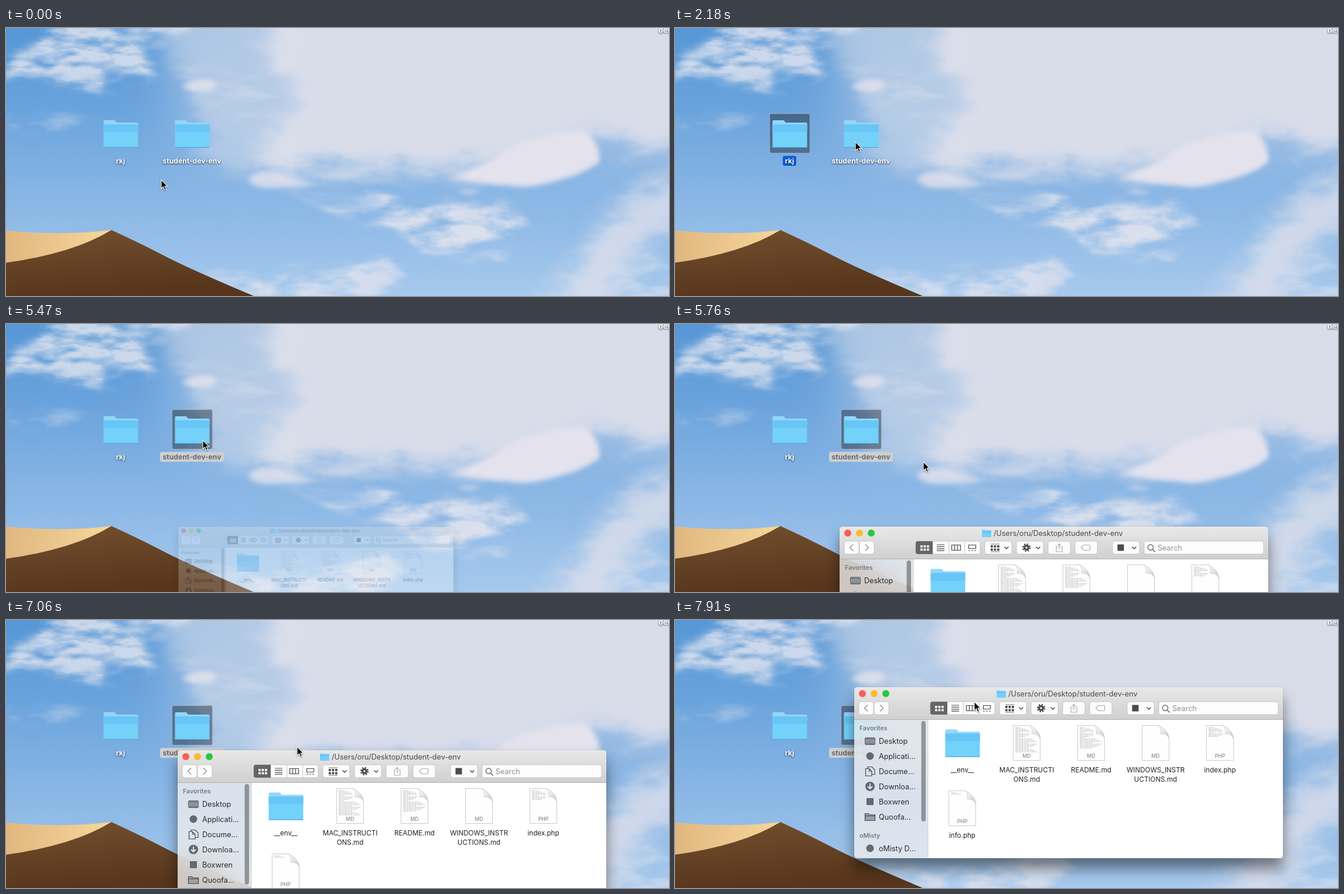
An HTML page for the animation above (8000 ms loop, 1132x459 px).

```html
<!DOCTYPE html>
<html lang="en">
<head>
<meta charset="utf-8">
<title>Opening a folder</title>
<style>
html, body { margin: 0; width: 100%; height: 100%; overflow: hidden; background: #84b2e3; }
#stage { position: relative; width: 100%; height: 100%; overflow: hidden; contain: strict; }
svg { position: absolute; left: 0; top: 0; display: block; }
text { font: 12.6px Inter, sans-serif; fill: #2b2b2b; }
#sky { will-change: transform; }
.desk { font-size: 12.1px; font-weight: 700; fill: #fff; text-anchor: middle; filter: drop-shadow(0 1px 1.5px #000b); }
.desk.inactive { fill: #6b6b6b; filter: none; }
.file { font-size: 11.6px; text-anchor: middle; fill: #222; }
.kind { font-size: 8.6px; text-anchor: middle; fill: #777; }
.head { font-size: 10.7px; font-weight: 600; fill: #74797e; }
.line { fill: none; stroke: #4a4a4a; stroke-width: 1.2; }
#win { position: absolute; left: 0; top: 0; width: 732px; height: 293px; border-radius: 5px;
  transform-origin: 37px 0; box-shadow: 0 18px 25px #0007, 0 0 1px #0009; }
#side { position: absolute; left: 0; top: 55px; width: 126px; height: 238px; border-radius: 0 0 0 5px;
  background: rgba(238, 238, 238, .79); backdrop-filter: blur(22px); }
</style>
</head>
<body>
<div id="stage">
<svg id="sky" width="1132" height="459">
  <defs>
    <linearGradient id="air" x2="0" y2="1">
      <stop stop-color="#5797d6"/><stop offset=".28" stop-color="#68a2dc"/>
      <stop offset=".6" stop-color="#86b4e4"/><stop offset="1" stop-color="#a6c9ed"/>
    </linearGradient>
    <linearGradient id="sand"><stop stop-color="#e0b780"/><stop offset="1" stop-color="#f6d799"/></linearGradient>
    <linearGradient id="dune" x2=".3" y2="1"><stop stop-color="#74502f"/><stop offset="1" stop-color="#57361c"/></linearGradient>
    <linearGradient id="bar" x2="0" y2="1"><stop stop-color="#e8e8e8"/><stop offset="1" stop-color="#d0d0d0"/></linearGradient>
    <linearGradient id="curl" x2="1" y2="1"><stop stop-color="#fff"/><stop offset="1" stop-color="#c9c9c9"/></linearGradient>
    <filter id="veil" filterUnits="userSpaceOnUse" x="-60" y="-60" width="1260" height="590" color-interpolation-filters="sRGB">
      <feTurbulence type="fractalNoise" baseFrequency=".012 .025" numOctaves="4" seed="4" result="noise"/>
      <feGaussianBlur in="SourceGraphic" stdDeviation="17"/>
      <feDisplacementMap in2="noise" scale="60" xChannelSelector="R" yChannelSelector="G"/>
    </filter>
    <filter id="wisp" filterUnits="userSpaceOnUse" x="-60" y="-60" width="1260" height="590" color-interpolation-filters="sRGB">
      <feTurbulence type="fractalNoise" baseFrequency=".012 .034" numOctaves="5" seed="9" result="noise"/>
      <feColorMatrix values="0 0 0 0 0  0 0 0 0 0  0 0 0 0 0  3.2 0 0 0 -.95" result="streaks"/>
      <feGaussianBlur in="SourceGraphic" stdDeviation="9"/>
      <feDisplacementMap in2="noise" scale="45" xChannelSelector="G" yChannelSelector="B"/>
      <feComposite in2="streaks" operator="in"/>
    </filter>
    <filter id="soft" x="-30%" y="-30%" width="160%" height="160%"><feGaussianBlur stdDeviation="4"/></filter>
    <filter id="haze" x="-30%" y="-30%" width="160%" height="160%"><feGaussianBlur stdDeviation="45"/></filter>
    <symbol id="folder" viewBox="0 0 60 49">
      <path d="M.5 10V3q0-2 2-2h16q2 0 3 2l1 2h35q2 0 2 2v8z" fill="#92d6f9"/>
      <path d="M.5 8h59v39q0 1-1 1h-57q-1 0-1-1z" fill="#74d1fa"/>
      <path d="M.5 8h59v13H.5z" fill="#67c6f6"/>
      <path d="M.5 47.6h59" stroke="#4a9fce"/>
    </symbol>
  </defs>
  <path fill="url(#air)" d="M0 0h1132v459H0z"/>
  <path filter="url(#haze)" fill="#d8deed" opacity=".45" d="M250-120H1250V225H400L300 200z"/>
  <g filter="url(#veil)" fill="#dfe0eb">
    <path opacity=".92" d="M430-60H1200V205L1090 205 1030 185 960 180 900 228 760 245 640 240 540 245 440 240 420 205 470 160 500 110 440 50z"/>
    <path opacity=".4" d="M250-60H500V250L380 245 335 215 340 150 300 70z"/>
    <path opacity=".8" d="M1200 215L1090 275 1020 325 985 400 900 480 1020 480 1070 410 1110 350 1200 330z"/>
  </g>
  <g filter="url(#wisp)" fill="#e0e3ee">
    <path opacity=".85" d="M-20 90L50 30 90-20 330-20 300 20 225 28 260 75 230 92 160 75 180 108 120 98 60 85z"/>
    <path opacity=".5" d="M-20 162L60 152 130 144 100 168 40 175z"/>
    <path opacity=".4" d="M300 60L420 90 480 140 400 150 320 120z"/>
    <path opacity=".9" d="M590 275L690 302 760 300 850 305 885 340 860 375 790 392 735 390 670 345z"/>
    <path opacity=".6" d="M480 275L600 300 700 350 640 340 540 310z"/>
    <path opacity=".8" d="M340 425L440 432 520 415 640 400 700 410 660 440 620 480 400 480z"/>
    <path opacity=".5" d="M1040 430L1150 370V480H1050z"/>
  </g>
  <g filter="url(#soft)" fill="#e3e2ed">
    <path d="M760 256Q830 230 860 205 920 178 985 176 1012 190 1014 228 990 250 930 264 890 276 860 270 800 266 760 256z"/>
    <path d="M300 100Q325 84 358 92 362 102 340 108 318 112 300 100z" opacity=".8"/>
    <path d="M413 258Q425 242 460 248 500 260 532 268 490 274 440 274 420 272 413 258z" opacity=".8"/>
    <path d="M768 280Q790 274 812 282 790 288 768 280z" opacity=".7"/>
  </g>
  <path fill="url(#sand)" d="M0 347Q100 356 180 346 170 380 0 404z"/>
  <path fill="url(#dune)" d="M0 402Q115 386 180 346 228 368 270 390T423 459H0z"/>
</svg>

<svg id="desktop" width="1132" height="459"></svg>

<div id="win"><div id="side"></div><svg id="panel" width="732" height="293"></svg></div>

<svg width="1132" height="459">
  <path id="cursor" d="M0 0V15.2L3.5 12 5.9 17.4 8.4 16.3 6.1 11.1H10.8z" stroke="#fff" stroke-width="1.1"
    style="filter:drop-shadow(0 1px 1px #0006)"/>
</svg>
</div>

<script>
const $ = id => document.getElementById(id);
const text = (x, y, string, cls = '', extra = '') => `<text x="${x}" y="${y}" class="${cls}" ${extra}>${string}</text>`;
const rect = (x, y, w, h, fill, r = 0, extra = '') =>
  `<rect x="${x}" y="${y}" width="${w}" height="${h}" rx="${r}" fill="${fill}" ${extra}/>`;
const line = (d, extra = '') => `<path class="line" d="${d}" ${extra}/>`;
const circle = (x, y, r, fill) => `<circle cx="${x}" cy="${y}" r="${r}" fill="${fill}"/>`;
const folder = (x, y, w = 60, h = 49) => `<use href="#folder" x="${x}" y="${y}" width="${w}" height="${h}"/>`;

// Desktop icons
const deskIcon = (id, x, name, labelX, labelWidth) => `
  <g id="${id}">
    ${rect(x - 4.5, 146.5, 69, 68, '#0000005c', 3, 'stroke="#b4b9c299" stroke-width="1.4"')}
    ${rect(labelX, 219, labelWidth, 17, '#0a5fdb', 3.5)}
  </g>
  ${folder(x, 157)}${text(labelX + labelWidth / 2, 232, name, 'desk', `id="${id}Name"`)}`;
$('desktop').innerHTML = deskIcon('first', 166, 'rkj', 184, 23) +
  deskIcon('second', 288, 'student-dev-env', 263, 109) + text(1125, 8, 'des', 'desk');

// Folder window
const button = (x, w) => rect(x, 25, w, 22, '#fcfcfc', 3.5, 'stroke="#bdbdbd" stroke-width=".8"');
const arrow = x => line(`M${x - 3.5} 34.5l3.5 3.5 3.5-3.5`, 'style="stroke-width:1.5"');
const grid = (x, fill) => [0, 1, 2, 3, 4, 5].map(i =>
  rect(x + i % 3 * 5.5, 32 + (i > 2) * 5.5, 3.8, 3.8, fill, .6)).join('');

const toolbar = () =>
  `<path d="M0 55V5q0-5 5-5h722q5 0 5 5v50z" fill="url(#bar)"/>` +
  line('M0 55.5H732', 'style="stroke:#b4b4b4;stroke-width:1"') +
  ['#fc5b57', '#fdbb2f', '#2ac840'].map((color, i) => circle(14 + 20 * i, 11, 6, color)).join('') +
  folder(243, 5, 16, 13) + text(263, 15.7, '/Users/oru/Desktop/student-dev-env', '', 'style="fill:#4a4a4a"') +
  [[8, 25], [34, 25], [130, 110], [248, 46], [302, 46], [356, 38], [402, 38], [466, 46], [520, 204]]
    .map(([x, w]) => button(x, w)).join('') +
  line('M23 30.5l-5.5 5.5 5.5 5.5M44 30.5l5.5 5.5-5.5 5.5', 'style="stroke:#8b8b8b"') +
  `<path d="M159 25h-25.5q-3.5 0-3.5 3.5v15q0 3.5 3.5 3.5H159z" fill="#666"/>` +
  grid(138, '#fff') +
  line('M186.5 25v22M213.5 25v22', 'style="stroke:#c8c8c8;stroke-width:1"') +
  line('M166 31h13m-13 3.4h13m-13 3.4h13m-13 3.4h13') +
  line('M191.5 31.5h15v9h-15zM196.5 31.5v9m5-9v9') +
  line('M220.5 31.5h12v6h-12zM220 41h3m2 0h3m2 0h3') +
  grid(258, '#4a4a4a') + line('M258 30h15M258 43h15', 'style="stroke-width:.8"') + arrow(285) +
  circle(319, 36, 5, '#4a4a4a') +
  `<circle cx="319" cy="36" r="6" class="line" style="stroke-width:2.4;stroke-dasharray:2.36"/>` +
  circle(319, 36, 1.8, '#fcfcfc') + arrow(339) +
  line('M373 34h-3v9h10v-9h-3M375 39.5v-10m-2.5 2.5l2.5-2.5 2.5 2.5M417 31.5h9q1.5 0 1.5 1.5v6q0 1.5-1.5 1.5h-9l-4.5-4.5z',
    'style="stroke:#adadad"') +
  rect(474.5, 30.5, 11, 11, '#4a4a4a') + arrow(503) +
  line('M534.5 39.5l4 4') + `<circle cx="531" cy="35.5" r="4.6" class="line"/>` +
  text(543, 40.6, 'Search', '', 'style="fill:#919191"');

const gray = '#62696f';
const sideIcons = {
  Desktop: rect(18.5, 86.5, 17, 12, '#8c9499', 1.5, `stroke="${gray}"`) + line('M19 88.5h16m-15 8.5h14', 'stroke-dasharray="2 1"'),
  'Applicati...': circle(27, 118, 6.5, gray),
  'Docume...': line('M23 139.5v-3h7l5 5v8h-5M19.5 139.5h6l4.5 4.5v8h-10.5zM25.5 140v4h4'),
  'Downloa...': circle(27, 170, 8, gray) + line('M27 165v9m-4-4l4 4 4-4', 'style="stroke:#eee;stroke-width:1.8"'),
  Boxwren: rect(21, 190, 12, 12, gray),
  'Quoofa...': line('M18.5 228.5v-12h6l1.5 2h9.5v10zM18.5 220.5h17', 'style="fill:#9aa1a6"'),
};
const sidebar = () =>
  text(9, 74, 'Favorites', 'head') + text(9, 258, 'oMisty', 'head') +
  Object.entries(sideIcons).map(([name, icon], i) => icon + text(42, 96.6 + 26 * i, name)).join('') +
  circle(27, 276, 6.5, gray) + text(42, 280.6, 'oMisty D...') +
  rect(114.5, 58, 7.5, 172, '#00000059', 3.7) +
  line('M126 56V293', 'style="stroke:#cdd2d6;stroke-width:1"');

// Small print on a page is a run of short strokes of varied length
const page = (x, y, kind, rows) => {
  let print = '';
  for (let i = 0; i < rows; i++) print += `M4 ${4 + 2.2 * i}h${10 + i * i * 7 % 16 + (i > 8 ? 12 : 0)}`;
  return `<g transform="translate(${x - 23.5} ${y})">
    <path d="M.5 .5H29Q46 10 46.5 23V60.5H.5z" fill="#fefefe" stroke="#c6c6c6" stroke-width=".9"/>
    <path d="${print}" stroke="#b4b4b4" stroke-width=".8" stroke-dasharray="5 .8 3 .6"/>
    <path d="M29 .5Q34 8 32 15 43 14 46.5 23 45 9 29 .5z" fill="url(#curl)" stroke="#c2c2c2" stroke-width=".6"/>
    ${text(23.5, 55.5, kind, 'kind')}</g>`;
};
const files = [
  ['__env__'], ['MAC_INSTRUCTI|ONS.md', 'MD', 20], ['README.md', 'MD', 17],
  ['WINDOWS_INSTR|UCTIONS.md', 'MD', 0], ['index.php', 'PHP', 8], ['info.php', 'PHP', 2],
];
const fileIcon = ([name, kind, rows], i) => {
  const x = 184.5 + 110 * (i % 5), y = 112 * Math.floor(i / 5);
  return (kind ? page(x, 65 + y, kind, rows) : folder(x - 29.5, 71.5)) +
    name.split('|').map((part, row) => text(x, 146 + y + 16 * row, part, 'file')).join('');
};
$('panel').innerHTML = `<path d="M126 55H732V288q0 5-5 5H126z" fill="#fff"/>` +
  toolbar() + sidebar() + files.map(fileIcon).join('');

// Motion: [time, x, y]
const LOOP = 8000, SELECT_FIRST = 1180, SELECT_SECOND = 2950, OPEN = 5420;
const cursorPath = [
  [0, 265, 260], [450, 265, 260], [560, 264, 263], [1120, 176, 185], [1310, 176, 185], [1710, 320, 286],
  [1960, 320, 286], [2180, 308, 195], [3080, 308, 195], [3300, 354, 306], [4130, 354, 306],
  [4190, 354, 295], [4480, 326, 172], [4700, 320, 192], [5420, 320, 192], [5760, 424, 236],
  [5980, 424, 236], [6700, 485, 371], [6820, 485, 371], [7060, 496.5, 217], [7300, 505, 148.5],
  [7560, 513, 140], [7910, 511, 140],
];
const windowPath = [
  [0, 281, 347], [6830, 281, 347], [7060, 293, 223], [7300, 303, 150],
  [7450, 306, 127], [7620, 308, 115], [7700, 308, 115], [7910, 306, 115],
];
const at = (path, t) => {
  const i = path.findIndex(key => key[0] > t);
  if (i < 0) return path[path.length - 1].slice(1);
  const [t0, x0, y0] = path[i - 1], [t1, x1, y1] = path[i], p = (t - t0) / (t1 - t0);
  return [Math.round(x0 + (x1 - x0) * p), Math.round(y0 + (y1 - y0) * p)];
};
const show = (id, visible) => $(id).style.visibility = visible ? 'visible' : 'hidden';

function draw() {
  const t = performance.now() % LOOP, opened = t >= OPEN;
  const [cx, cy] = at(cursorPath, t), [wx, wy] = at(windowPath, t);
  const zoom = Math.min(1, Math.max(0, (t - OPEN) / 180));
  $('cursor').setAttribute('transform', `translate(${cx} ${cy})`);
  $('win').style.transform = `translate(${wx}px, ${wy}px) scale(${.5 + .5 * zoom})`;
  $('win').style.opacity = zoom;
  show('first', t >= SELECT_FIRST && t < SELECT_SECOND);
  show('second', t >= SELECT_SECOND);
  $('second').lastElementChild.setAttribute('fill', opened ? '#cdcfd2' : '#0a5fdb');
  $('secondName').classList.toggle('inactive', opened);
  requestAnimationFrame(draw);
}
draw();
</script>
</body>
</html>
```
